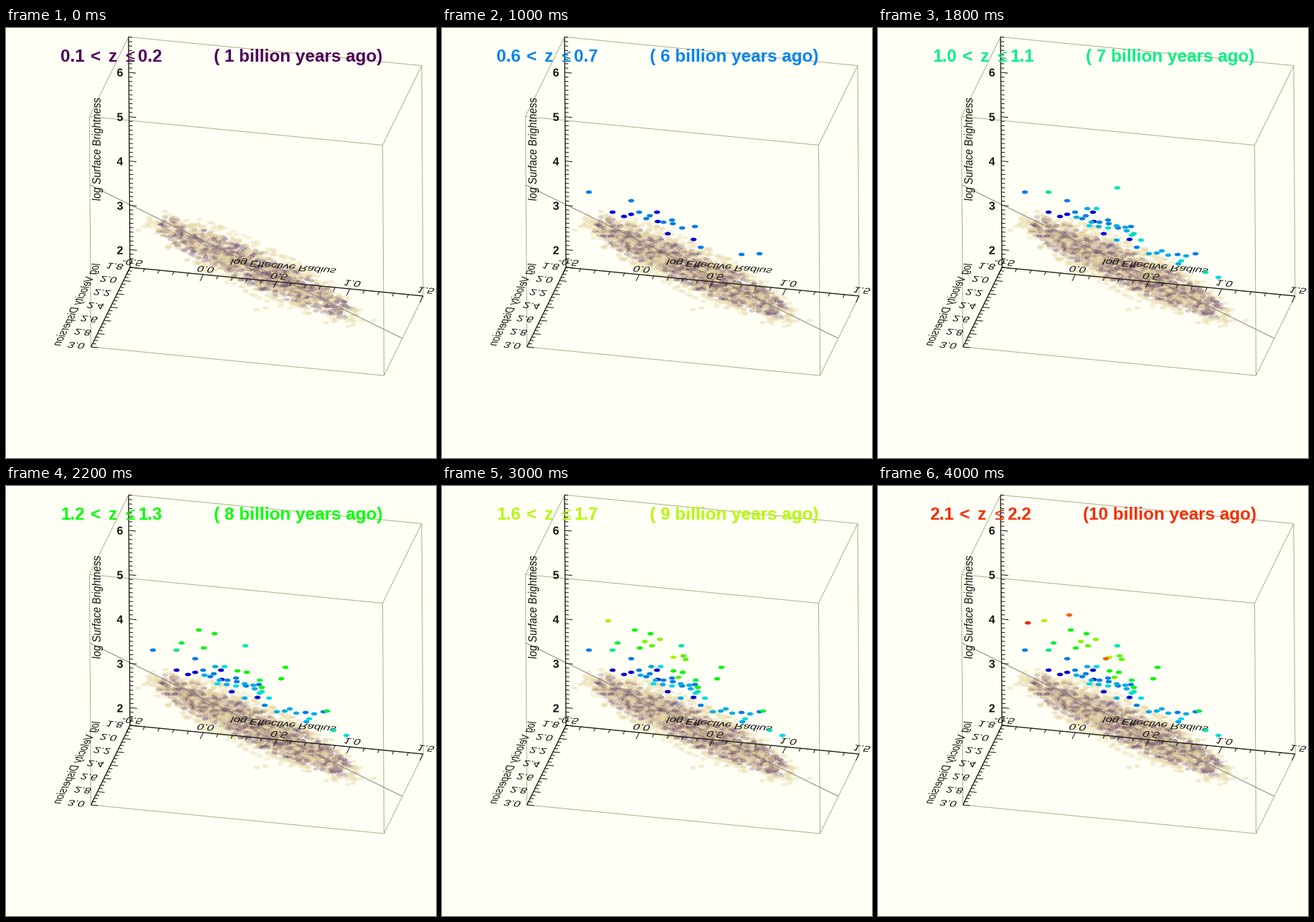
A matplotlib script that plays this animation: 600 px wide and 600 px high, repeating every 4.2 s.

```python
import numpy as np
import matplotlib.pyplot as plt
from matplotlib.animation import FuncAnimation
from matplotlib.collections import EllipseCollection, LineCollection
from matplotlib.patches import PathPatch
from matplotlib.textpath import TextPath
from matplotlib.transforms import Affine2D

FRAMES, INTERVAL = 21, 200
PX = 0.72  # points per pixel at 100 dpi
FONT = "Liberation Sans"
INK, BOX, PLANE = "#14140c", "#aeae84", "#84847a"

# Projected corner of the box and its three edge vectors
ORIGIN = np.array([173.0, 334.0])
EX, EY, EZ = np.array([409.0, 40.0]), np.array([-54.5, 111.0]), np.array([-2.0, -321.5])

# Size of one em along each projected axis
EM_X, EM_Y, EM_Z = np.array([16.6, 1.55]), np.array([-5.6, 11.4]), np.array([0, -14.3])

fig = plt.figure(figsize=(6, 6), dpi=100, facecolor="#fffff6")
ax = fig.add_axes([0, 0, 1, 1])
ax.set(xlim=(0, 600), ylim=(600, 0))
ax.axis("off")


def lines(segments, color, width, z):
    ax.add_collection(LineCollection(segments, colors=color, linewidths=width * PX, zorder=z))


def flat_text(text, center, along, up, weight="normal"):
    """Draw text lying in the plane spanned by two em vectors."""
    path = TextPath((0, 0), text, size=1, prop={"family": FONT, "weight": weight})
    box = path.get_extents()
    centred = Affine2D().translate(-(box.x0 + box.x1) / 2, -0.35)
    plane = Affine2D.from_values(*along, *up, *center)
    ax.add_patch(PathPatch((centred + plane).transform_path(path), fc=INK, lw=0, zorder=4))


def ticks(edge, values, direction, is_major):
    """Ticks at fractions of an edge."""
    unit = direction / np.hypot(*direction)
    start = [ORIGIN + edge * v for v in values]
    lines([(p, p + unit * (10 if is_major(i) else 5)) for i, p in enumerate(start)], INK, 1, 4)


def draw_box():
    edges = []
    for a, b, c in ((EX, EY, EZ), (EY, EX, EZ), (EZ, EX, EY)):
        for i, j in ((0, 0), (0, 1), (1, 0), (1, 1)):
            p = ORIGIN + i * b + j * c
            edges.append((p, p + a))
    lines(edges, BOX, 1, 3)
    lines([(ORIGIN, ORIGIN + e) for e in (EX, EY, EZ)], INK, 1.2, 4)
    lines([((117, 219), (553, 433))], PLANE, 1, 3)

    ticks(EX, np.linspace(0, 1, 21), EY, lambda i: i % 5 == 0)
    ticks(EY, np.linspace(0, 1, 25), EX, lambda i: i % 4 == 0)
    ticks(EZ, np.arange(53) / 52, EX, lambda i: i % 10 == 4)

    for i in range(5):
        flat_text(f"{-0.5 + 0.5 * i:.1f}", (176 + 102.5 * i, 327 + 9.8 * i), EM_X, EM_Y)
    for i in range(7):
        flat_text(f"{1.8 + 0.2 * i:.1f}", (152 - 9 * i, 332.5 + 18.4 * i), EM_X, EM_Y)
    for i in range(5):
        flat_text(str(2 + i), (159, 310 - 62 * i), (16, 0), (0, -16), "bold")

    flat_text("log Effective Radius", (387, 333), EM_X, EM_Y)
    flat_text("log Velocity Dispersion", (98, 386), EM_Y, -EM_X)
    flat_text("log Surface Brightness", (126, 169), EM_Z, -EM_X)


def make_cloud(count=2600):
    rng = np.random.default_rng(4)
    u = 2 * rng.beta(1.9, 1.9, count) - 1
    v = np.clip(rng.normal(0, 0.43, count), -1.1, 1.1)
    x = 347 + 150 * u
    y = 335 + 0.45 * (x - 347) + 35 * v * np.sqrt(1 - 0.85 * u**2)
    core = (np.abs(v) < 0.75) & (np.abs(u) < 0.9) & (rng.random(count) < 0.45)
    colors = np.where(core[:, None], (0.41, 0.27, 0.41, 0.28), (0.91, 0.85, 0.66, 0.42))
    strays = [(175, 257), (222, 256), (193, 277), (252, 324), (267, 321),
              (350, 393), (362, 391), (513, 408), (185, 282), (447, 411)]
    points = np.vstack([strays, np.column_stack([x, y])])
    return points, np.vstack([np.tile((0.91, 0.85, 0.66, 0.5), (len(strays), 1)), colors])


# Distant galaxies, keyed by the redshift step in which they appear
GALAXIES = {
    3: [(238, 257), (264, 260), (300, 257), (301, 270), (315, 287), (351, 295), (254, 263)],
    5: [(205, 229), (264, 241), (275, 257), (285, 266), (290, 262), (309, 271), (321, 268),
        (322, 273), (335, 279), (353, 277), (361, 306), (418, 316), (443, 315)],
    6: [(277, 264), (292, 252), (298, 271), (308, 277), (333, 276), (345, 278), (347, 283),
        (333, 296), (378, 315), (389, 314), (396, 311), (405, 317), (430, 318), (419, 329)],
    7: [(305, 252), (295, 276), (321, 279), (354, 289), (367, 296), (423, 325), (475, 348)],
    8: [(334, 223), (357, 287), (457, 341)],
    9: [(238, 229)],
    10: [(245, 219), (354, 271), (448, 314)],
    11: [(269, 201), (291, 206), (276, 226), (390, 253), (384, 269), (323, 258), (336, 260),
         (357, 281)],
    13: [(293, 223), (337, 237), (340, 242), (330, 267)],
    14: [(304, 214), (283, 217)],
    15: [(232, 188), (323, 239)],
    19: [(267, 180), (318, 241)],
    20: [(209, 191)],
}

COLOR_STEPS = [0, 3, 5, 7, 9, 11, 15, 18, 20]
COLOR_KEYS = np.array([(75, 0, 85), (0, 0, 220), (0, 130, 240), (0, 225, 235), (0, 240, 130),
                       (0, 255, 0), (180, 250, 0), (255, 160, 0), (245, 45, 0)]) / 255


def step_color(step):
    return [np.interp(step, COLOR_STEPS, channel) for channel in COLOR_KEYS.T]


def lookback(z):
    """Light travel time in billions of years for a flat universe."""
    s = np.linspace(0, z, 400)
    f = 1 / ((1 + s) * np.sqrt(0.3 * (1 + s) ** 3 + 0.7))
    return 13.97 * np.sum((f[1:] + f[:-1]) / 2) * (s[1] - s[0])


draw_box()
cloud_points, cloud_colors = make_cloud()
galaxy_points = np.array([p for group in GALAXIES.values() for p in group])
galaxy_steps = np.array([k for k, group in GALAXIES.items() for _ in group])
galaxy_colors = np.array([step_color(k) for k in galaxy_steps]) * 0.97


def ellipses(z):
    dots = EllipseCollection([8.5], [4.8], [0], units="xy", offsets=np.empty((0, 2)),
                             offset_transform=ax.transData, linewidths=0, zorder=z)
    ax.add_collection(dots, autolim=False)
    return dots


cloud, galaxies = ellipses(2), ellipses(5)
TITLE_X = (76, 118, 143, 166, 184, 290)
title = [ax.text(x, 47, "", family=FONT, size=24.2 * PX, zorder=6,
                 weight="normal" if x == 166 else "bold") for x in TITLE_X]


def update(step):
    shown = int(len(cloud_points) * min(1, 0.75 + 0.125 * step))
    cloud.set_offsets(cloud_points[:shown])
    cloud.set_facecolor(cloud_colors[:shown])

    seen = galaxy_steps <= step
    galaxies.set_offsets(galaxy_points[seen])
    galaxies.set_facecolor(galaxy_colors[seen])

    low = 0.1 * (step + 1)
    age = int(lookback(low + 0.05))
    words = (f"{low:.1f}", "<", "z", "≤", f"{low + 0.1:.1f}", f"({age:2d} billion years ago)")
    for label, x, word in zip(title, TITLE_X, words):
        label.set(text=word, x=x - 4 * (age > 9), color=step_color(step))
    return [cloud, galaxies, *title]


anim = FuncAnimation(fig, update, frames=FRAMES, interval=INTERVAL, repeat=True, repeat_delay=0)
plt.show()
```
